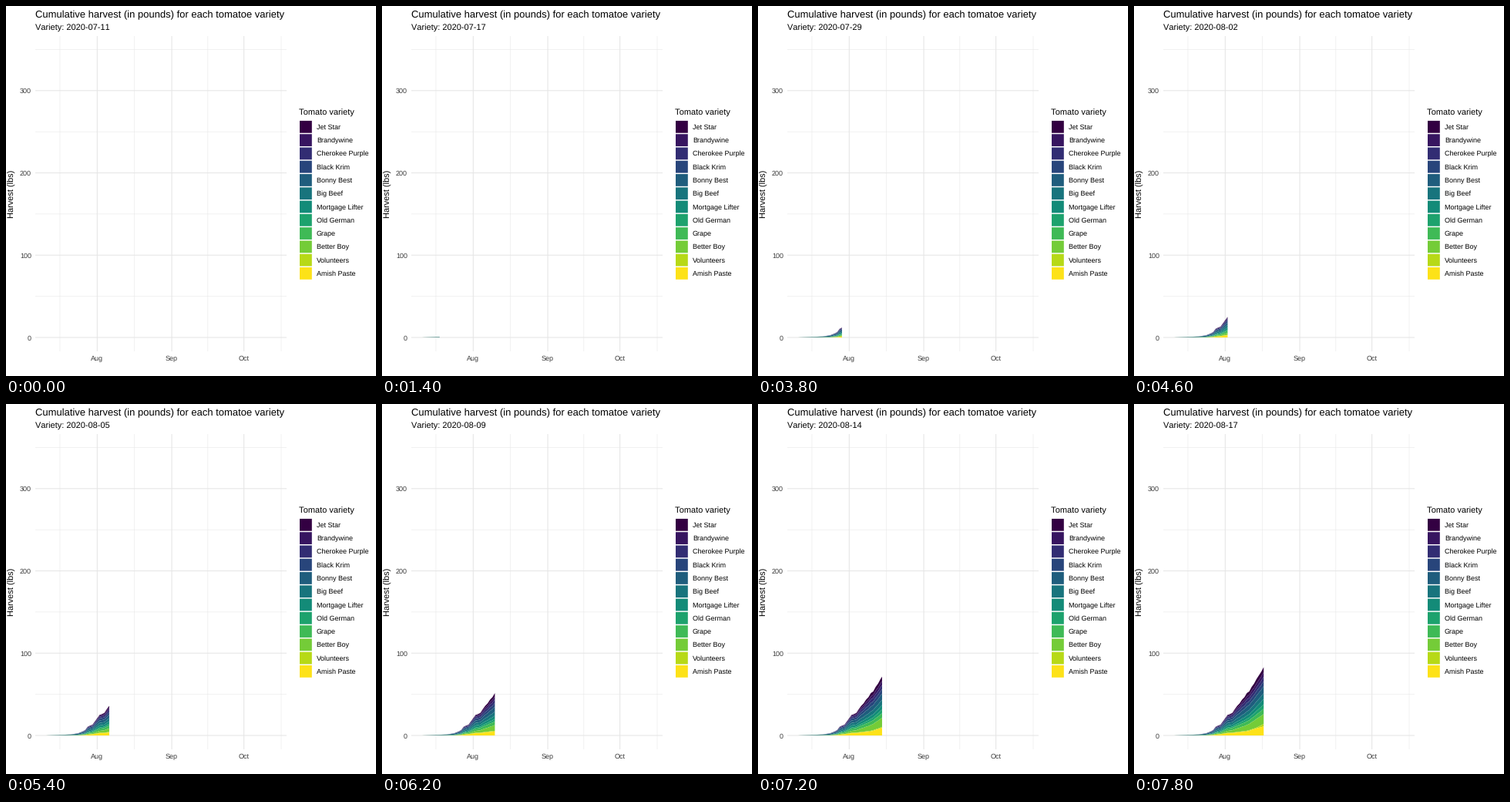
These frames come from a looping animation (480x480 px, 8000 ms). A matplotlib script:

```python
import matplotlib.pyplot as plt
import numpy as np
from matplotlib.animation import FuncAnimation
from matplotlib.patches import Polygon, Rectangle

plt.rcParams.update({
    "font.family": "Liberation Sans",
    "text.hinting": "none",
    "text.hinting_factor": 1,
})

SIZE, DPI = 480, 72
FRAMES, INTERVAL = 40, 200
DAYS_PER_FRAME = 95 / 99
START = np.datetime64("2020-07-11")

X0, DAY = 52.8, 3.12        # first date and pixels per day
Y0, POUND = 430, 1.0675     # zero line and pixels per pound
LEFT, RIGHT, TOP, BOTTOM = 38, 364, 39, 448

NAMES = ["Jet Star", "Brandywine", "Cherokee Purple", "Black Krim",
         "Bonny Best", "Big Beef", "Mortgage Lifter", "Old German",
         "Grape", "Better Boy", "Volunteers", "Amish Paste"]

# Total harvest in pounds at chosen days
TOTAL_DAYS = [0, 7, 10, 11, 13, 15, 16, 17, 18, 19, 20, 21, 22, 23, 24, 25,
              26, 27, 28, 29, 30, 31, 32, 33, 34, 36, 37]
TOTALS = [0.05, 0.8, 1.3, 1.7, 2.6, 5, 6.5, 10.5, 12, 13, 17, 21, 25, 26,
          27.5, 32, 36, 39, 43.5, 46.5, 51.5, 53.5, 59, 63, 68.5, 77.5, 83]

# Relative weight of each variety, in legend order
MIX_DAYS = [0, 13, 16, 22, 30, 34, 37]
MIX = np.array([
    [0, 0, 0.1, 0.7, 4, 5.5, 6],
    [0, 0, 0.3, 1.5, 3.5, 5, 5.5],
    [0, 0.1, 0.5, 2, 4.5, 5, 5.5],
    [0, 0.3, 0.8, 2.5, 4.5, 5.5, 6],
    [0, 1.2, 1.4, 3, 6, 7.5, 8.5],
    [0, 0.4, 0.9, 3, 5, 6.5, 7],
    [0, 0.1, 0.6, 2.5, 4, 5.5, 6.5],
    [0, 0.1, 0.3, 1.5, 3, 4.5, 5.5],
    [0.05, 0.3, 0.7, 2.7, 4.5, 5.5, 6.5],
    [0, 0.1, 0.4, 2.3, 7, 11, 12],
    [0, 0, 0.1, 0.4, 0.8, 1, 3],
    [0, 0, 0.4, 2.9, 5, 9, 11],
])


def tone(rgb):
    return tuple(np.asarray(rgb[:3]) ** 1.22)


def grey(level):
    return tone((level,) * 3)


COLORS = [tone(plt.cm.viridis(v)) for v in np.linspace(0, 1, len(NAMES))]

days = np.array([d for d in range(38) if d != 35])
day_frames = np.round(days / DAYS_PER_FRAME)
totals = np.interp(days, TOTAL_DAYS, TOTALS)
weights = np.array([np.interp(days, MIX_DAYS, row) for row in MIX])
pounds = weights / weights.sum(axis=0) * totals
# Upper edge of every layer, stacked from the last variety upwards
edges = np.vstack([np.cumsum(pounds[::-1], axis=0)[::-1],
                   np.zeros(len(days))])

fig = plt.figure(figsize=(SIZE / DPI, SIZE / DPI), dpi=DPI, facecolor="white")
ax = fig.add_axes([0, 0, 1, 1])
ax.set(xlim=(0, SIZE), ylim=(SIZE, 0))
ax.axis("off")


def label(x, y, text, size, color="black", **kw):
    return ax.text(x, y, text, fontsize=size, color=color,
                   **{"va": "baseline", **kw})


def grid_line(xs, ys, width):
    ax.plot(xs, ys, color=grey(0.92), lw=width, zorder=1, snap=False,
            solid_capstyle="butt")


def vline(day, width):
    grid_line([X0 + day * DAY] * 2, [TOP, BOTTOM], width)


def hline(value, width):
    grid_line([LEFT, RIGHT], [Y0 - value * POUND] * 2, width)


for day in (5.5, 36.5, 67, 97.5):
    vline(day, 0.53)
for value in range(50, 351, 100):
    hline(value, 0.53)
for day, month in ((21, "Aug"), (52, "Sep"), (82, "Oct")):
    vline(day, 1.07)
    label(X0 + day * DAY, 460, month, 8.8, grey(0.3), ha="center")
for value in range(0, 301, 100):
    hline(value, 1.07)
    label(33, Y0 + 3.6 - value * POUND, str(value), 8.8, grey(0.3),
          ha="right")

label(38, 15, "Cumulative harvest (in pounds) for each tomatoe variety", 13.2)
subtitle = label(38, 32, "", 11)
label(13.3, 243.5, "Harvest (lbs)", 11, rotation=90, ha="right", va="center")

label(380, 142, "Tomato variety", 11)
for i, (name, color) in enumerate(zip(NAMES, COLORS)):
    y = 156.8 + 17.28 * i
    ax.add_patch(Rectangle((381, y - 7.9), 15.8, 15.8, fc=color, lw=0,
                           snap=False))
    label(403, y + 3.2, name, 8.8)

layers = [ax.add_patch(Polygon([(0, 0)] * 3, fc=c, lw=0, zorder=3,
                               snap=False))
          for c in COLORS]


def draw(frame):
    subtitle.set_text(f"Variety: {START + int(frame * DAYS_PER_FRAME)}")

    past = day_frames < frame
    tip = np.interp(frame, day_frames, days)
    xs = X0 + DAY * np.append(days[past], tip)
    ys = [Y0 - POUND * np.append(e[past], np.interp(frame, day_frames, e))
          for e in edges]
    for layer, upper, lower in zip(layers, ys, ys[1:]):
        layer.set_xy(np.column_stack([np.append(xs, xs[::-1]),
                                      np.append(upper, lower[::-1])]))
        layer.set_visible(frame > 0)
    return [subtitle, *layers]


anim = FuncAnimation(fig, draw, frames=FRAMES, interval=INTERVAL,
                     repeat=True, repeat_delay=0)
plt.show()
```
